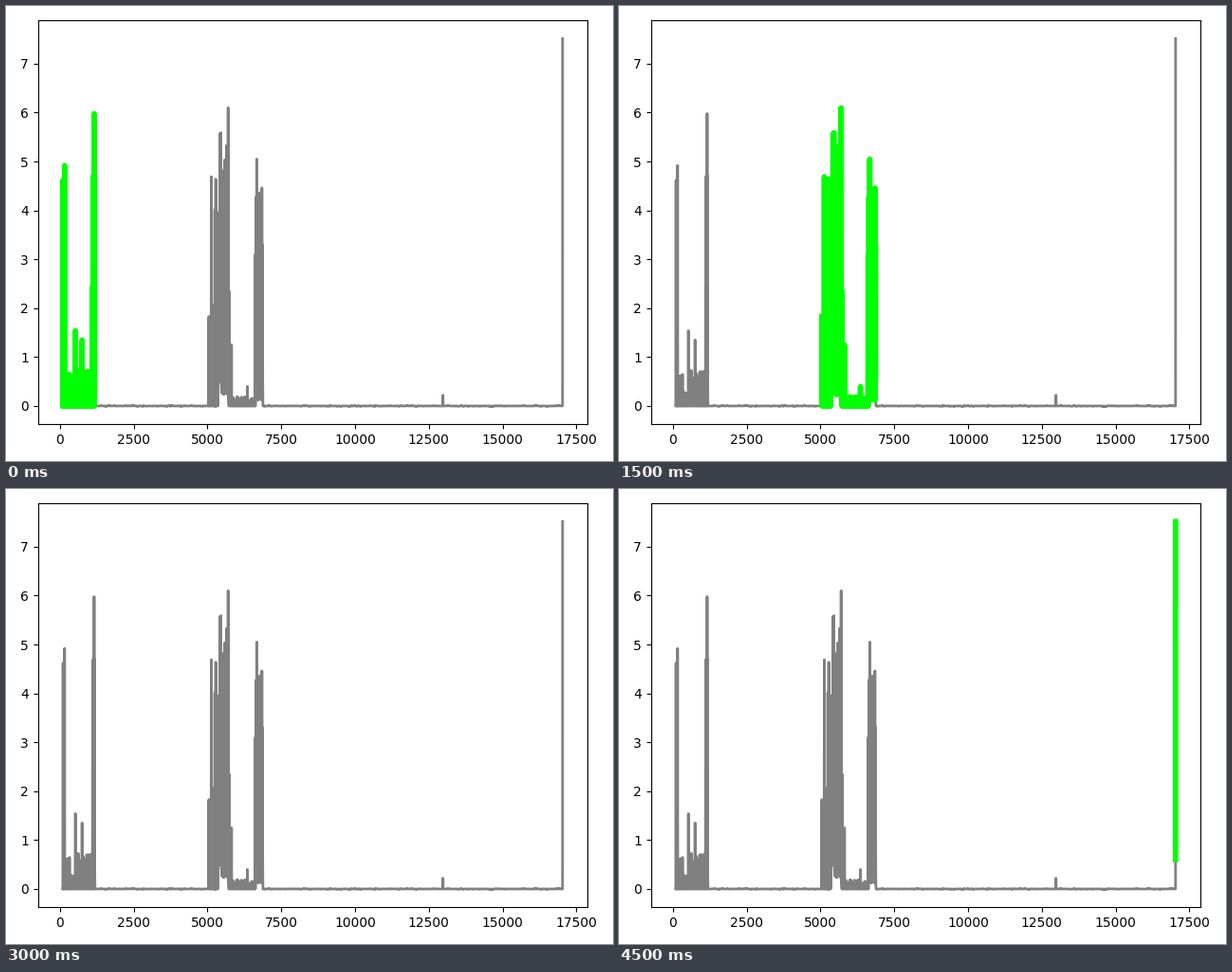
A matplotlib script that plays this animation: 640x480 px, repeating every 6000 ms.

```python
import numpy as np
import matplotlib.pyplot as plt
from matplotlib.animation import FuncAnimation

rng = np.random.default_rng(4)


def spike(x, top, floor=0.0, gap=7):
    """Rise to a peak and fall back to the floor just beside it."""
    return [(x - gap, floor), (x, top), (x + gap, floor)]


def rumble(start, stop, low, high, floor=(0, 0), step=30):
    """Evenly spaced spikes with random heights and random floors."""
    points = []
    for x in np.arange(start, stop, step):
        points += spike(x, rng.uniform(low, high), rng.uniform(*floor))
    return points


def quiet(start, stop):
    """A nearly flat stretch with a few tiny bumps."""
    xs = np.arange(start, stop, 30)
    bumps = rng.uniform(-0.015, 0.015, len(xs)) * (rng.random(len(xs)) < 0.25)
    return list(zip(xs, bumps))


first = (
    [(98, 0)]
    + spike(106, 4.62) + rumble(120, 150, 4.4, 4.6, step=14) + spike(158, 4.92)
    + rumble(205, 330, 0.35, 0.65) + rumble(350, 510, 0.2, 0.3)
    + spike(525, 1.54) + rumble(560, 740, 0.4, 0.75)
    + spike(750, 1.35) + rumble(790, 1100, 0.55, 0.72)
    + spike(1108, 2.45) + spike(1125, 4.7)
    + spike(1160, 5.98) + spike(1175, 4.7, 0.25)
)

second = (
    [(5050, 1.83)]
    + rumble(5060, 5120, 1.4, 1.85) + spike(5130, 4.69)
    + rumble(5160, 5240, 1.8, 2.1) + spike(5280, 4.64)
    + rumble(5250, 5360, 3.7, 4.1) + rumble(5370, 5420, 3.9, 4.1, (0.4, 0.6))
    + rumble(5425, 5470, 5.55, 5.62, (0.4, 0.6))
    + rumble(5495, 5690, 4.3, 5.4, (0.2, 0.5)) + spike(5700, 6.1, 0.25)
    + spike(5735, 2.35) + spike(5815, 1.25)
    + rumble(5850, 6340, 0.08, 0.2) + spike(6355, 0.4)
    + rumble(6380, 6600, 0.1, 0.17)
    + spike(6615, 3.1) + spike(6640, 4.27, 0.3) + spike(6670, 5.05, 0.4)
    + rumble(6695, 6830, 3.8, 4.4, (0.1, 0.5)) + spike(6845, 4.46, 0.12)
    + [(6865, 3.3), (6872, 0.6)]
)

last = [(17033, 0.6), (17034, 7.515)]

signal = (
    first + quiet(1190, 5045) + second + quiet(6880, 12960)
    + spike(12980, 0.22) + quiet(13000, 17020) + [(17032, 0)] + last
)
highlights = [first, second, [], last]

fig, ax = plt.subplots(figsize=(6.4, 4.8), dpi=100)
ax.plot(*zip(*signal), color="gray", lw=2)
marker, = ax.plot([], [], color="lime", lw=4)
ax.set_xlim(-747, 17881)
ax.set_ylim(-0.375, 7.89)
fig.tight_layout()


def update(frame):
    points = np.array(highlights[frame]).reshape(-1, 2)
    marker.set_data(points[:, 0], points[:, 1])
    return marker,


anim = FuncAnimation(fig, update, frames=len(highlights), interval=1500, repeat=True)
plt.show()
```
